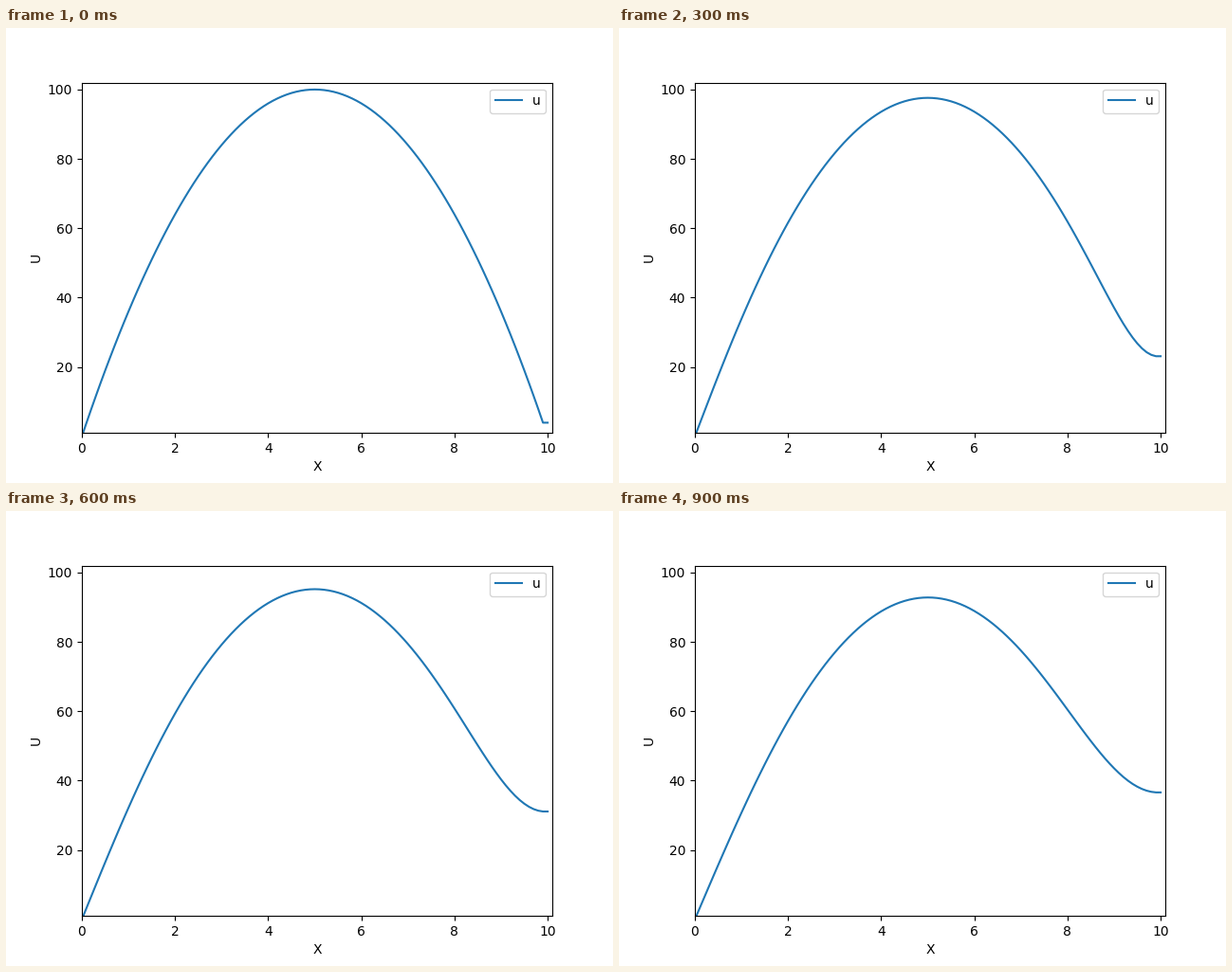
A matplotlib script that plays this animation: 640 px wide and 480 px high, repeating every 1000 ms.

```python
import numpy as np
import matplotlib.pyplot as plt
from matplotlib.animation import FuncAnimation

FRAMES = 10
LENGTH = 10.0
DX = 0.1
DT = 0.1


def implicit_matrix(n, r):
    """Backward Euler diffusion: fixed left end, insulated right end."""
    a = (1 + 2 * r) * np.eye(n) - r * np.eye(n, k=1) - r * np.eye(n, k=-1)
    a[0] = 0
    a[0, 0] = 1
    a[-1] = 0
    a[-1, -2:] = -1, 1
    return a


def solve(x):
    u = 4 * x * (LENGTH - x)
    u[-1] = u[-2]
    a = implicit_matrix(len(x), DT / DX**2)
    states = [u]
    for _ in range(FRAMES - 1):
        rhs = states[-1].copy()
        rhs[0] = rhs[-1] = 0
        states.append(np.linalg.solve(a, rhs))
    return states


x = np.linspace(0, LENGTH, round(LENGTH / DX) + 1)
states = solve(x)

fig, ax = plt.subplots(figsize=(6.4, 4.8), dpi=100)
line, = ax.plot(x, states[0], color="#1f77b4", lw=1.5, label="u")
ax.set(xlim=(0, 10.1), ylim=(1, 102), xlabel="X", ylabel="U")
ax.legend(loc="upper right")


def update(frame):
    line.set_ydata(states[frame])
    return line,


anim = FuncAnimation(fig, update, frames=FRAMES, interval=100, repeat=True)
plt.show()
```
